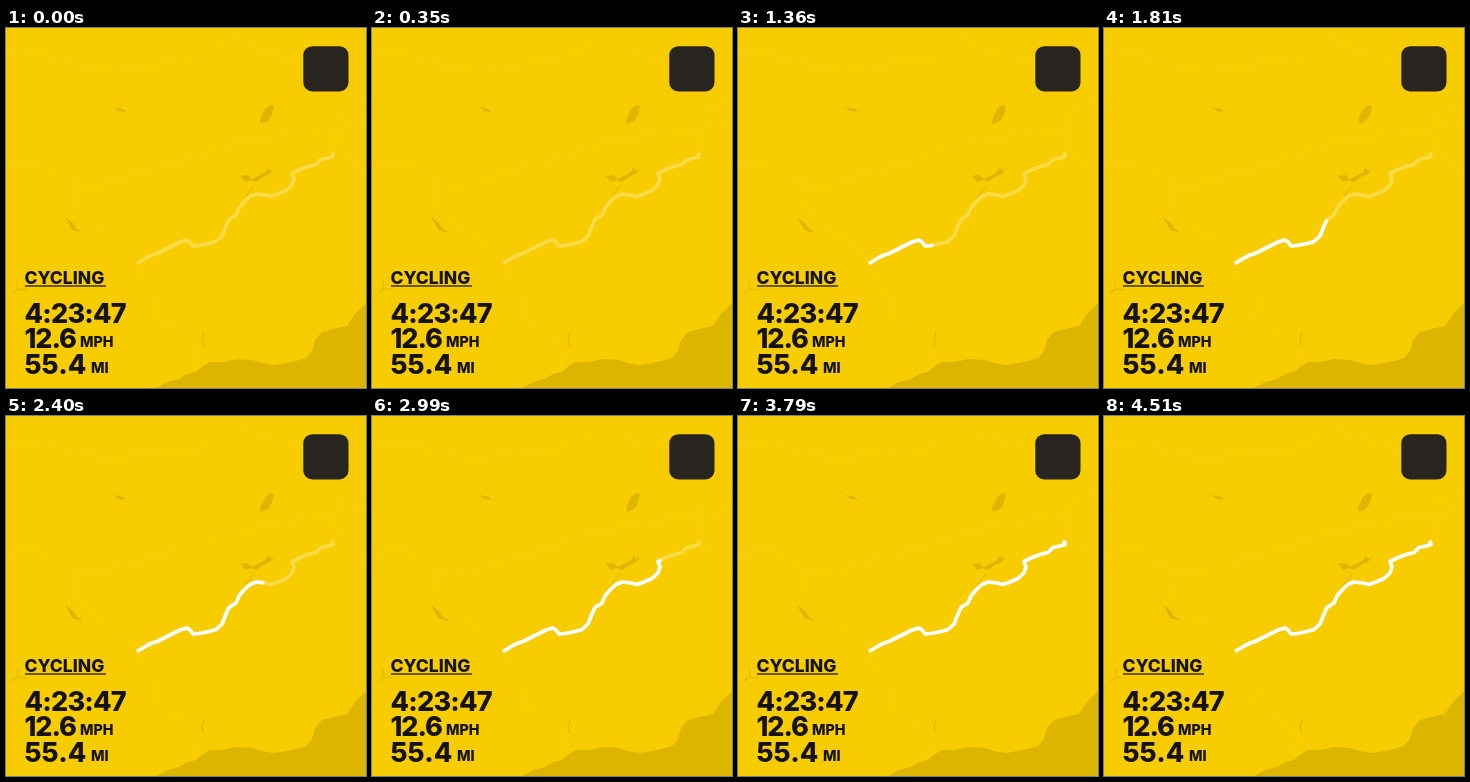
Write an HTML page that moves like this. It is 360 px wide and 360 px high and loops after 5.1 s.

```html
<!DOCTYPE html>
<html lang="en">
<head>
<meta charset="utf-8">
<title>Cycling route</title>
<style>
  html, body { margin: 0; width: 100%; height: 100%; overflow: hidden; background: #f7cc00; }
  svg { display: block; width: 100vw; height: 100vh; }
  path { fill: none; }
  text { font: 800 27px Inter, sans-serif; fill: #15120a; }
  .label { font-size: 17.5px; }
  .unit { font-size: 14.3px; }
  .sea { fill: #dcb500; }
  .lakes path { fill: #dcb600; }
  .river { stroke: #dfba00; stroke-width: 1.2; stroke-linejoin: round; }
  .road { stroke: #fad72f; stroke-width: .8; opacity: .3; }
  .route { stroke: #fff; stroke-width: 3.7; stroke-linejoin: round; }
</style>
</head>
<body>
<svg viewBox="0 0 360 360">
  <defs>
    <path id="route" pathLength="1" d="M131 235.500L141 229.500 146 227 151 225.500 158 222 163 219.500 168 217 174 214 181 212 184 214 187 218 193 217.500 203 215.500 210 213.500 216 208 220 198 223 191.500 230 187 233 180 238 174 244 168.500 250 166 259 167 265 168.500 272 166 280 162.500 286 157 288 151 286 145.500 293 142 302 138.500 310 136.500 315 131.500 322 130 327 128.500 326 124.500"/>
  </defs>
  <rect width="360" height="360" fill="#f7cc00"/>
  <g class="road">
    <path d="M0 27Q35 23 62 34T130 39 190 33L217 17 228 10 248 20 296 34"/>
    <path d="M0 137L34 134 65 155 88 158 120 148 150 140 185 130 225 116 270 108 305 101 327 103 360 91"/>
    <path d="M66 155L68 178 87 199 113 214 132 235 135 251 153 272 151 289 181 307 194 325 188 341"/>
    <path d="M327 125L331 115 327 103 334 83 360 71M327 125L346 133 360 148"/>
  </g>
  <path class="sea" d="M150 360L161 354 173 351 181 346 190 344 197 338 204 334 216 334 231 331 246 332 258 335.500 268 337 280 335 290 333 300 330 306 323 309 312 316 304 331 300 341 298 349 286 360 275V360Z"/>
  <g class="lakes">
    <path d="M259 81L264 77 268 78 266 87 262 93 255 96 254 92Z"/>
    <path d="M107 79L117 81 120 84 113 83Z"/>
    <path d="M59 189L67 195 70 200 77 205 66 202 63 196Z"/>
    <path d="M227 145L233 148 241 147 246 151 254 147 259 144 262 139 264 143 268 141 264 146 257 149 250 154 245 152 239 154 235 149Z"/>
  </g>
  <path class="river" d="M248 158L244 163 240 168M198 304L196 311 198 318M6 265L12 261 11 253M12 261L21 262"/>
  <use href="#route" class="route" opacity=".28"/>
  <use href="#route" class="route" id="progress"/>
  <rect x="297.300" y="18.200" width="45.200" height="45.200" rx="9" fill="#28241f"/>
  <text x="18.500" y="255.500" class="label">CYCLING</text>
  <rect x="19" y="257.400" width="81" height="1.200" fill="#15120a"/>
  <text x="18.500" y="295" letter-spacing="-.8">4:23:47</text>
  <text x="18.500" y="320" letter-spacing="-1.1">12.6</text>
  <text x="74" y="319" class="unit">MPH</text>
  <text x="18.500" y="346">55.4</text>
  <text x="85" y="344.500" class="unit">MI</text>
</svg>
<script>
  const LOOP = 5100, STEP = 73.75;
  const progress = document.getElementById('progress');

  function draw(now) {
    const step = Math.floor((now % LOOP + 36) / STEP);
    const done = Math.min(1, Math.max(0, (step - 5.6) / 43.2));
    progress.style.strokeDasharray = `${done} 2`;
    progress.style.visibility = done ? 'visible' : 'hidden';
    requestAnimationFrame(() => draw(performance.now()));
  }
  draw(0);
</script>
</body>
</html>
```
